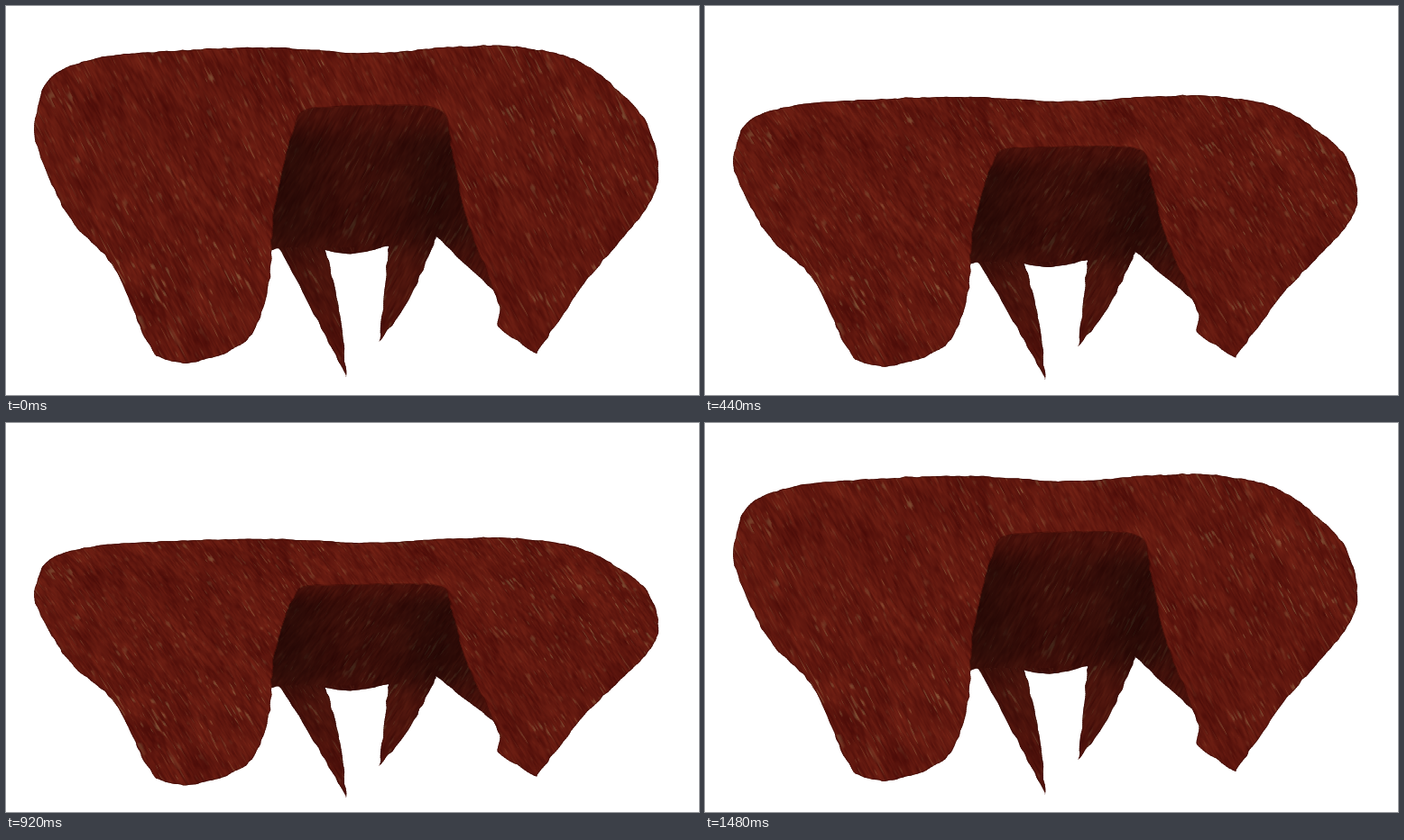
Recreate the animation shown at these times as an HTML page with a canvas. Size 768 by 432 pixels, loop 1.52 s.

```html
<!DOCTYPE html>
<html lang="en">
<head>
<meta charset="utf-8">
<title>Squashing shell</title>
<style>
  html, body { margin: 0; width: 100%; height: 100%; overflow: hidden; background: #fff; }
  canvas { display: block; width: 768px; height: 432px; }
</style>
</head>
<body>
<canvas id="stage" width="768" height="432"></canvas>
<script>
const W = 768, H = 432, LOOP = 1520, STEP = 40, TOP = 44;
const ctx = document.getElementById('stage').getContext('2d');

// Key points in the stretched pose
const BODY = outline(`33,150 37,104 50,79 78,64 128,54 285,46 400,52 540,44 625,57 670,86
  713,136 720,205 645,303 588,386 545,355 547,335 511,238 494,160 487,122 470,112 345,113
  324,122 297,230 291,310 268,370 205,396 165,386 117,286 72,238`, 1);
const INNER = outline(`305,105 500,105 545,320 477,256 447,325 414,372 424,266 388,275
  354,271 370,340 377,411 302,269 288,274`, 2);

function hash(x, y, seed) {
  let h = Math.imul(x, 374761393) ^ Math.imul(y, 668265263) ^ Math.imul(seed, 974634777);
  h = Math.imul(h ^ (h >>> 13), 1274126177);
  return ((h ^ (h >>> 16)) >>> 0) / 4294967296;
}

function noise(x, y, seed) {
  const i = Math.floor(x), j = Math.floor(y);
  let u = x - i, v = y - j;
  u *= u * (3 - 2 * u);
  v *= v * (3 - 2 * v);
  const a = hash(i, j, seed), b = hash(i + 1, j, seed);
  const c = hash(i, j + 1, seed), d = hash(i + 1, j + 1, seed);
  return a + (b - a) * u + (c - a + (a - b - c + d) * u) * v;
}

function bell(x, mid, width) {
  return Math.exp(-(((x - mid) / width) ** 2));
}

function ramp(x, from, to) {
  const q = Math.min(1, Math.max(0, (x - from) / (to - from)));
  return q * q * (3 - 2 * q);
}

// Unit tangent at b, fading to nothing at sharp corners
function tangent(a, b, c) {
  const unit = (p, q) => {
    const len = Math.hypot(q[0] - p[0], q[1] - p[1]);
    return [(q[0] - p[0]) / len, (q[1] - p[1]) / len];
  };
  const p = unit(a, b), q = unit(b, c), t = unit(a, c);
  const soft = Math.sqrt(Math.max(0, p[0] * q[0] + p[1] * q[1]));
  return [t[0] * soft, t[1] * soft];
}

// Smooth closed curve with a slightly rough edge
function outline(text, seed) {
  const pts = text.trim().split(/\s+/).map(p => p.split(',').map(Number));
  const n = pts.length, out = [];
  for (let i = 0; i < n; i++) {
    const [a, b, c, d] = [-1, 0, 1, 2].map(k => pts[(i + k + n) % n]);
    const from = tangent(a, b, c), to = tangent(b, c, d);
    const len = Math.hypot(c[0] - b[0], c[1] - b[1]);
    const parts = Math.ceil(len / 3);
    for (let k = 0; k < parts; k++) {
      const t = k / parts, t2 = t * t, t3 = t2 * t, e = out.length / 2.2;
      out.push([0, 1].map(m =>
        (2 * t3 - 3 * t2 + 1) * b[m] + (3 * t2 - 2 * t3) * c[m] +
        len * ((t3 - 2 * t2 + t) * from[m] + (t3 - t2) * to[m]) +
        (noise(e, 9 * m, seed) - 0.5) * 1.6));
    }
  }
  return out;
}

function innerLight(x, y) {
  const depth = ramp(y, 118, 158) * (1 - ramp(y, 240, 300));
  const sides = Math.min(1, bell(x, 312, 40) + bell(x, 478, 45));
  return 0.72 - depth * (0.13 + 0.15 * sides) + 0.14 * ramp(y, 300, 390);
}

// Streaky fibres running along one diagonal
function fibres(seed, light, leansRight) {
  const tex = document.createElement('canvas');
  tex.width = W;
  tex.height = H;
  const g = tex.getContext('2d'), img = g.createImageData(W, H);
  for (let y = 0, o = 0; y < H; y++) {
    for (let x = 0; x < W; x++, o += 4) {
      const fx = leansRight(x, y) ? -x : x;
      const s = 0.47 * fx + 0.88 * y, t = 0.88 * fx - 0.47 * y;
      const v = 0.32 * noise(t / 3, s / 18, seed) + 0.36 * noise(t / 1.4, s / 8, seed + 1)
        + 0.32 * noise(t / 18, s / 36, seed + 2);
      const glint = ramp(noise(t / 1.7, s / 11, seed + 3), 0.7, 1) * noise(t / 20, s / 30, seed + 4);
      const k = light(x, y);
      img.data[o] = k * (72 + 54 * v + 34 * glint);
      img.data[o + 1] = k * (9 + 30 * v + 62 * glint);
      img.data[o + 2] = k * (6 + 18 * v + 42 * glint);
      img.data[o + 3] = 255;
    }
  }
  g.putImageData(img, 0, 0);
  return tex;
}

const bodySkin = fibres(11, () => 0.97, () => false);
const innerSkin = fibres(31, innerLight, (x, y) => x > 385 || y < 268);

// How far the top edge has sunk
function sink(t) {
  return 43.3 + 43.3 * Math.cos(0.0035 * (t - 808)) - 2.1 * Math.max(0, 1 - t / 200);
}

function press(y, d) {
  const q = 1 - 0.0021 * (y - TOP);
  return y + d * q * q;
}

function shape(pts, d) {
  const path = new Path2D();
  for (const [x, y] of pts) {
    const arch = 0.09 * d * bell(y, 118, 35) * Math.exp(-(((x - 405) / 100) ** 4));
    path.lineTo(x, press(y, d) + arch);
  }
  path.closePath();
  return path;
}

function paint(pts, skin, d) {
  const path = shape(pts, d);
  ctx.save();
  ctx.clip(path);
  for (let y = 36; y < 422; y += 2) {
    const top = press(y, d);
    ctx.drawImage(skin, 0, y, W, 2, 0, top, W, press(y + 2, d) - top + 0.8);
  }
  ctx.strokeStyle = 'rgba(38,6,2,.4)';
  ctx.lineWidth = 1.8;
  ctx.stroke(path);
  ctx.restore();
}

function draw(now) {
  const d = sink(Math.floor((now % LOOP) / STEP) * STEP);
  ctx.fillStyle = '#fff';
  ctx.fillRect(0, 0, W, H);
  paint(INNER, innerSkin, d);
  paint(BODY, bodySkin, d);
}

let start;
function tick(now) {
  start ??= now;
  draw(now - start);
  requestAnimationFrame(tick);
}
draw(0);
requestAnimationFrame(tick);
</script>
</body>
</html>
```
